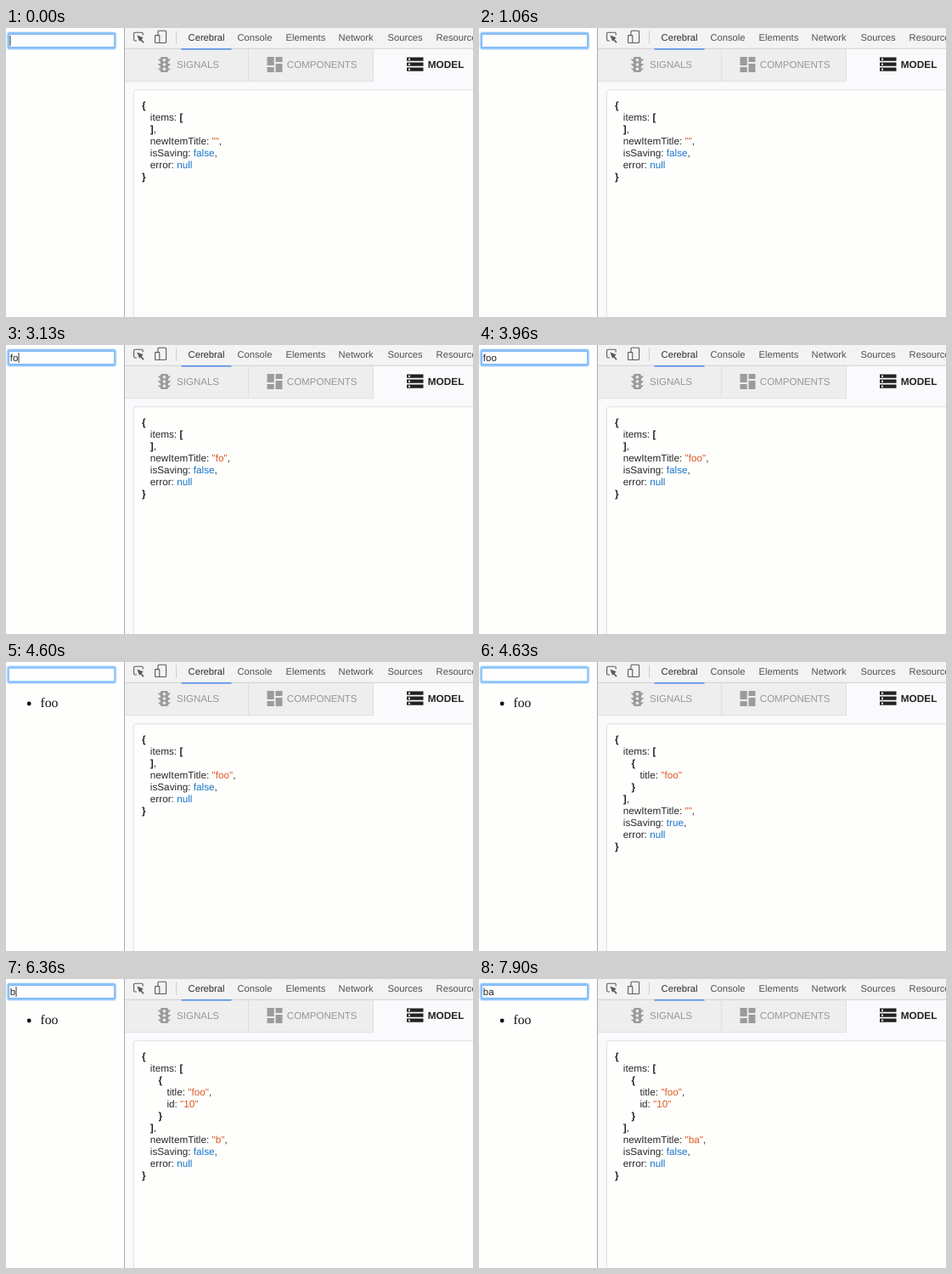
These frames come from a looping animation (550x340 px, 8000 ms). An HTML page:

```html
<!DOCTYPE html>
<html lang="en">
<head>
<meta charset="utf-8">
<title>Form and model inspector</title>
<style>
  html, body { margin: 0; width: 100%; height: 100%; overflow: hidden; background: #fefefd; }
  svg { display: block; width: 550px; height: 340px; }
  text { font-family: "Liberation Sans", Arial, sans-serif; text-rendering: geometricPrecision; }
  .tools text { font-size: 11.2px; fill: #505050; }
  .tools .selected { fill: #2c2c2c; }
  .tabs text { font-size: 11.55px; fill: #979797; }
  .tabs .active { font-size: 11.8px; font-weight: bold; fill: #222; }
  #model text { font-size: 11.75px; fill: #272727; }
  #model .brace { font-weight: bold; fill: #222; }
  #model .string { fill: #dc5a22; }
  #model .value { fill: #1a74c8; }
  #typed { font-size: 11.5px; fill: #222; }
  #item text { font: 15.8px "Liberation Serif", Times, serif; fill: #111; }
</style>
</head>
<body>
<svg viewBox="0 0 550 340">
  <rect width="550" height="340" fill="#fefefd"/>

  <g id="field">
    <rect x=".5" y="4" width="130" height="22" rx="4" fill="#d9ebfd"/>
    <rect x="1.5" y="5" width="128" height="20" rx="3" fill="#8ec4fb"/>
    <rect id="box" x="3.6" y="7.5" width="124" height="15" fill="#fefefe"/>
    <text id="typed" x="4.8" y="19"></text>
    <rect id="caret" y="9" width="1" height="12" fill="#333"/>
  </g>

  <g id="item">
    <circle cx="27.2" cy="49" r="2.4" fill="#111"/>
    <text x="40.4" y="53">foo</text>
  </g>

  <rect x="140" width="410" height="340" fill="#fafafd"/>
  <rect x="139" width="1" height="340" fill="#a9a9b6"/>

  <g class="tabs">
    <rect x="140" y="24" width="292" height="38.5" fill="#eee"/>
    <path d="M140 62.7h292.5V25M285.5 25v37.5" fill="none" stroke="#dfdfdf"/>
    <g fill="#9b9b9b">
      <path d="M178.6 36.5h15.6l-4 4.2h-7.6zM178.6 42h15.6l-4 4.2h-7.6zM178.6 47.5h15.6l-4 3.5h-7.6z"/>
      <rect x="181.9" y="34" width="9" height="18" rx="1.6"/>
      <path d="M307.5 34h8.2v10h-8.2zM317.5 34h8v6h-8zM307.5 46h8.2v6h-8.2zM317.5 42h8v10h-8z"/>
    </g>
    <g fill="#eee">
      <circle cx="186.4" cy="37.8" r="1.8"/>
      <circle cx="186.4" cy="43" r="1.8"/>
      <circle cx="186.4" cy="48.2" r="1.8"/>
    </g>
    <path d="M472 34.6h19.5v4.2H472zM472 40.6h19.5v4.2H472zM472 46.6h19.5v4.2H472z" fill="#222"/>
    <path d="M474 35.7h2v2h-2zM474 41.7h2v2h-2zM474 47.7h2v2h-2z" fill="#fff"/>
    <text x="201" y="47.3">SIGNALS</text>
    <text x="330.8" y="47.3">COMPONENTS</text>
    <text class="active" x="496.8" y="47.3">MODEL</text>
  </g>

  <g class="tools">
    <rect x="140" width="410" height="24" fill="#f3f3f3"/>
    <rect x="140" y="23.7" width="410" height="1" fill="#d0d0d0"/>
    <rect x="206.5" y="24" width="59" height="1.6" fill="#5590ea"/>
    <rect x="200" y="3.5" width="1" height="15" fill="#ccc"/>
    <g fill="none" stroke="#5a5a5a" stroke-width="1.1">
      <path d="M154 15h-2.2q-1.2 0-1.2-1.2V6.4q0-1.2 1.2-1.2h8.2q1.2 0 1.2 1.2V8.6"/>
      <path d="M158 12.6l4 4.6" stroke-width="1.7"/>
      <rect x="179" y="3.3" width="9.6" height="14.2" rx="1"/>
      <rect x="175.6" y="8.6" width="5.2" height="8.9" rx=".8" fill="#f3f3f3"/>
    </g>
    <path d="M154.3 8.4l7.4 2.8-4.6 4.5z" fill="#5a5a5a"/>
    <text class="selected" x="214.6" y="15">Cerebral</text>
    <text x="272.5" y="15">Console</text>
    <text x="329.6" y="15">Elements</text>
    <text x="391.6" y="15">Network</text>
    <text x="449.6" y="15">Sources</text>
    <text x="506.6" y="15">Resources</text>
  </g>

  <rect x="150.3" y="72.8" width="420" height="290" rx="3" fill="#fefefd" stroke="#dedee2"/>
  <g id="model"></g>
</svg>

<script>
const LOOP = 8000;
const CARET_X = { "": 4, f: 8, fo: 14, foo: 21, b: 11, ba: 17 };

// Each entry changes only the listed properties from its time on.
const steps = [
  [0, { typed: "", caret: true, disabled: false, listed: false, title: "", saving: false, stored: false, id: false }],
  [60, { caret: false }],
  [560, { caret: true }],
  [1060, { caret: false }],
  [1560, { caret: true }],
  [1830, { typed: "f" }],
  [1860, { title: "f" }],
  [2100, { typed: "fo" }],
  [2130, { title: "fo" }],
  [2630, { caret: false }],
  [3130, { caret: true }],
  [3460, { typed: "foo" }],
  [3500, { title: "foo" }],
  [3960, { caret: false }],
  [4460, { caret: true }],
  [4600, { typed: "", caret: false, disabled: true, listed: true }],
  [4630, { title: "", saving: true, stored: true }],
  [5630, { disabled: false, caret: true }],
  [5660, { saving: false, id: true }],
  [6130, { caret: false }],
  [6330, { typed: "b", caret: true }],
  [6360, { title: "b" }],
  [6830, { caret: false }],
  [7330, { caret: true }],
  [7400, { typed: "ba" }],
  [7430, { title: "ba" }],
  [7900, { caret: false }]
];
let merged = {};
const states = steps.map(([time, change]) => ({ time, ...(merged = { ...merged, ...change }) }));

const el = id => document.getElementById(id);
const span = (kind, text) => `<tspan class="${kind}">${text}</tspan>`;
const brace = text => span("brace", text);
const string = text => span("string", `"${text}"`);
const value = text => span("value", text);

function modelLines(s) {
  const entry = s.stored ? [
    [2, brace("{")],
    [3, "title: " + string("foo") + (s.id ? "," : "")],
    ...(s.id ? [[3, "id: " + string("10")]] : []),
    [2, brace("}")]
  ] : [];
  return [
    [0, brace("{")],
    [1, "items: " + brace("[")],
    ...entry,
    [1, brace("]") + ","],
    [1, "newItemTitle: " + string(s.title) + ","],
    [1, "isSaving: " + value(s.saving) + ","],
    [1, "error: " + value("null")],
    [0, brace("}")]
  ];
}

const show = (id, visible) => el(id).setAttribute("visibility", visible ? "visible" : "hidden");

function render(s) {
  show("caret", s.caret);
  show("item", s.listed);
  el("box").setAttribute("stroke", s.disabled ? "#9accfc" : "#7fb6f0");
  el("typed").textContent = s.typed;
  el("caret").setAttribute("x", CARET_X[s.typed] + 0.5);
  el("model").innerHTML = modelLines(s).map(([depth, content], i) =>
    `<text x="${160 + depth * 9.8}" y="${95 + i * 14}">${content}</text>`).join("");
}

let current;
const start = performance.now();
function tick() {
  const time = (performance.now() - start) % LOOP;
  const next = states.findLast(s => s.time <= time) || states[0];
  if (next !== current) render(current = next);
  requestAnimationFrame(tick);
}
tick();
</script>
</body>
</html>
```
